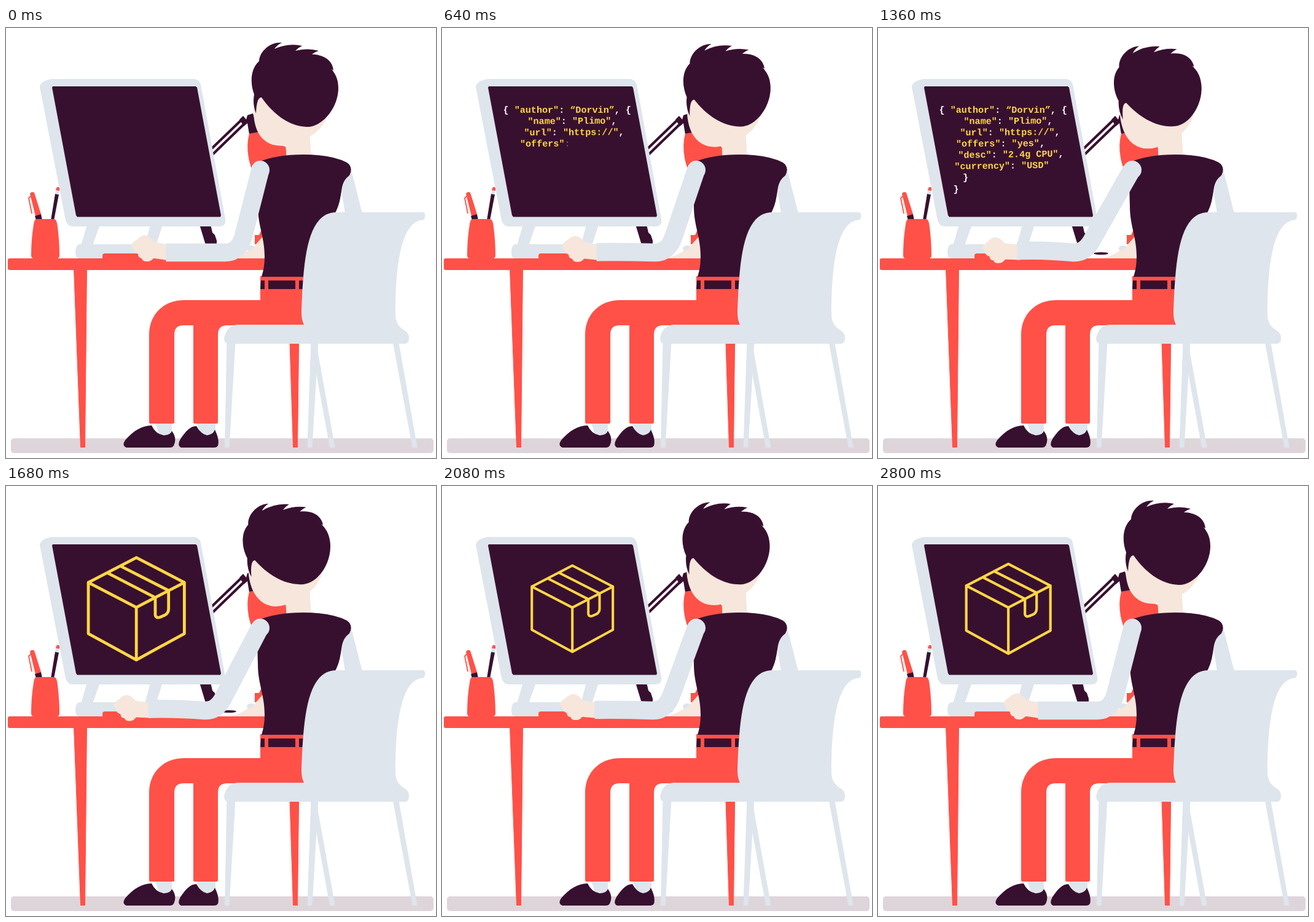
Write an HTML page that moves like this. It is 700 px wide and 700 px high and loops after 2.88 s.

```html
<!DOCTYPE html>
<html lang="en">
<head>
<meta charset="utf-8">
<title>Coder at a desk</title>
<style>
  html, body { margin: 0; width: 100%; height: 100%; overflow: hidden; background: #fff; }
  svg { display: block; width: 100%; height: 100%; }
  .dark { fill: #38102f; }
  .red { fill: #ff5148; }
  .pale { fill: #dee5ec; }
  .skin { fill: #f6e6dc; }
  .legs { stroke-width: 1; stroke-linejoin: round; }
  .pale.legs { stroke: #dee5ec; }
  .red.legs { stroke: #ff5148; }
  .line { fill: none; stroke: #38102f; }
  #code { font: bold 15.1px "Liberation Mono", "Courier New", monospace; fill: #fff; }
  #code text { white-space: pre; }
  #code .str { fill: #ffd746; }
  #box { fill: none; stroke: #ffd746; stroke-width: 4.2; stroke-linejoin: round; stroke-linecap: round; }
</style>
</head>
<body>
<svg viewBox="0 0 700 700">
  <rect x="8" y="668" width="688" height="24" rx="5" fill="#ded5db"/>

  <!-- lamp -->
  <path class="line" stroke-width="4.2" d="M332 199L386 147M332 210L392 152"/>
  <path class="dark" d="M380 149L386 143L391 149L393 142L402 139L412 172L396 173L393 155L387 160Z"/>
  <path class="red" d="M396 172Q391 190 395 212Q398 226 402 234L430 232L457 215L456 195Q455 192 450 192L436 165Z"/>
  <path class="dark" d="M315 320H333L336 333L340 337L343 346V353H325Z"/>
  <ellipse class="dark" cx="363" cy="367" rx="12" ry="2"/>
  <path class="red" d="M405 337H412L418 324H424V352H405Z"/>

  <!-- desk -->
  <rect class="red" x="3" y="375" width="425" height="19" rx="3"/>
  <path class="red legs" d="M110.5 390H131.5L128.5 682.5H121.5Z M461 480H477L474.5 682.5H467.5Z"/>

  <!-- pens and cup -->
  <path class="red" d="M39 270Q41 265 46 268L57 303L48 306Z"/>
  <path d="M41 273L37 277L42 302" fill="none" stroke="#ff5148" stroke-width="1.8"/>
  <path class="dark" d="M47 306L57 303L59 313H49Z M80 270L86 271L78 313H73Z"/>
  <path class="pale" d="M81 263L87 264L86 271L80 270Z"/>
  <path class="red" d="M81 264Q82 258 86 259Q88 261 87 265Z"/>
  <path class="red" d="M50 311H78Q83 311 84 324Q87 348 87 370Q87 375 83 375H45Q41 375 41 370Q41 344 45 320Q46 311 50 311Z"/>

  <!-- monitor -->
  <path class="pale" d="M132 320H153L141 354H122Z M235 320H255L244 354H226Z"/>
  <path class="pale" d="M119 352H320V375H118Q113 374 113 365Q113 354 119 352Z"/>
  <path class="pale" d="M55 96Q56 86 75 83H306Q315 84 317 92L357 311Q359 323 346 323H109Q100 323 97 313Z"/>
  <path class="dark" d="M76 95H309L311 97L350 305L349 307.5H116L114 305L75 97Z"/>
  <g id="code"></g>
  <path id="box" d="M0 -73L68.5 -37.5V35.5L0 73L-68.5 35.5V-37.5ZM-68.5 -37.5L0 -2L68.5 -37.5M0 -2V73
    M-41 -51L27 -16V9Q28 14 34 12L41 9Q46 6 46 0V-26L-23 -61"/>
  <rect class="red" x="157" y="367" width="70" height="10" rx="4"/>

  <!-- far arm -->
  <ellipse class="pale" cx="399" cy="359" rx="7" ry="5"/>
  <path class="skin" d="M366 375Q386 369 394 362Q402 362 406 353L422 335V375Z"/>
  <path class="pale" d="M562 231L580 302H552L546 264L550 240Z"/>

  <!-- legs and shoes -->
  <path class="pale" d="M242 640H270V664H250Z M309 640H341V664H318Z"/>
  <path class="dark" d="M196 683Q188 680 194 671C207 656 221 647 237 647Q244 662 258 663Q268 662 270 656Q279 668 273 680Q271 683 267 683Z
    M285 683Q278 680 284 669C292 657 300 648 310 648Q317 661 327 663Q337 662 340 654Q348 670 345 680Q343 683 339 683Z"/>
  <path class="red" d="M414 404H490V484H360Q345 484 345 499V642Q345 644 343 644H307Q305 644 305 642V484H289Q274 484 274 499V642Q274 644 272 644H235Q233 644 233 642V499C233 466 257 443 290 443H414Z"/>
  <path class="dark" d="M415 411H421V425H414Z M427 411H471V425H427Z M477 411H490V425H477Z"/>

  <path class="skin" d="M453 165H494L497 212H457Z"/>
  <g id="head">
    <path class="skin" d="M405 112C399 148 406 181 434 190Q446 193 455 191L494 177Q512 167 522 147L500 110Z"/>
    <path class="dark" d="M449 24C433 22 413 36 412 54C398 66 397 90 404 108Q401 124 407 139Q408 112 416 113C434 139 460 160 490 161C516 161 541 129 541 98C541 84 537 76 530 67L533 69C532 54 519 43 498 43Q503 39 509 37Q491 32 471 37Q476 32 482 29Q460 24 437 34Q442 27 449 24Z"/>
  </g>
  <path class="dark" d="M408 219Q440 206 484 206Q530 206 555 219Q566 227 559 240C546 250 547 262 545 272Q542 292 534 304L500 405H416Q421 390 421 372C421 340 410 322 410 290Z"/>

  <!-- chair -->
  <path class="pale legs" d="M360 510H373L363 682.5H356.5Z M497 510H508L498 682.5H491Z M496 510H504L535 682.5H527.5Z M630 510H638.5L669 682.5H662Z"/>
  <path class="pale" d="M538 300H678Q683 300 682 307Q682 313 675 313C648 318 634 368 634 466Q634 483 647 491Q657 497 656 505Q656 513 650 514H360Q353 510 356 501Q361 484 377 483H485Q481 475 481 463C484 380 489 300 538 300Z"/>

  <!-- near arm -->
  <path id="hand" class="skin" d="M204 354Q207 347 214 344Q222 336 229 338Q236 340 241 348Q252 351 264 352V378Q250 376 240 375Q235 381 229 380Q222 380 221 375Q215 374 215 368Q208 365 207 358Z"/>
  <circle class="pale" cx="414" cy="231" r="15"/>
  <path id="arm" fill="none" stroke="#dee5ec" stroke-width="29.5"/>
</svg>
<script>
const LOOP = 2880, STEP = 80, SWING = 2800, CLEAR = 1400, TYPE_RATE = 0.102;
const $ = id => document.getElementById(id);
const clamp = v => Math.min(1, Math.max(0, v));
const mix = (a, b, k) => a + (b - a) * k;
const smooth = u => u * u * (3 - 2 * u);
const easeOut = u => 1 - (1 - u) ** 2;

// x, tilt in degrees, text
const LINES = [
  [99.5, 0, '{ "author": “Dorvin”, {'],
  [139.5, -0.3, '"name": "Plimo",'],
  [133.5, -0.3, '"url": "https://",'],
  [127, -0.4, '"offers": "yes",'],
  [130.5, -0.8, '"desc": "2.4g CPU",'],
  [124.5, -0.8, '"currency": "USD"'],
  [138, 0, '}'],
  [122.5, 0, '}']
];

function add(parent, tag, attrs) {
  const el = document.createElementNS('http://www.w3.org/2000/svg', tag);
  for (const key in attrs) el.setAttribute(key, attrs[key]);
  return parent.appendChild(el);
}

const chars = [];
LINES.forEach(([x, tilt, str], row) => {
  const y = 138 + row * 18.4;
  const line = add($('code'), 'text', { x, y, transform: `rotate(${tilt} ${x} ${y})` });
  let quoted = false;
  for (const ch of str) {
    const quote = /["“”]/.test(ch);
    const span = add(line, 'tspan', quoted || quote ? { class: 'str' } : {});
    span.textContent = ch;
    if (quote) quoted = !quoted;
    chars.push(span);
  }
});

// time, scale, easing into it
const POP = [[CLEAR, 0], [1760, 1.2, easeOut], [2080, 0.963, smooth], [2360, 1, smooth]];

function boxScale(t) {
  for (let i = 1; i < POP.length; i++) {
    const [t0, s0] = POP[i - 1], [t1, s1, ease] = POP[i];
    if (t < t1) return mix(s0, s1, ease(clamp((t - t0) / (t1 - t0))));
  }
  return 1;
}

// shoulder, bend start, elbow, bend end, forearm control, wrist
const ARM_NEAR = [414, 231, 386.5, 339, 379, 365.5, 357, 365.5, 310, 365.5, 260.5, 365.5];
const ARM_FAR = [413, 231, 350, 342, 338, 366.5, 318, 365.5, 270, 361, 226.5, 362.5];

function draw(t) {
  const lean = (1 - Math.cos(2 * Math.PI * t / SWING)) / 2;
  const reach = lean ** 1.6;
  $('head').setAttribute('transform', `rotate(${-7.6 * lean} 478 206)`);
  $('hand').setAttribute('transform', `translate(${-34 * reach} 0) rotate(${-5 * reach} 262 365)`);
  const p = ARM_NEAR.map((v, i) => mix(v, ARM_FAR[i], reach));
  $('arm').setAttribute('d', `M${p[0]} ${p[1]}L${p[2]} ${p[3]}Q${p.slice(4, 8).join(' ')}Q${p.slice(8).join(' ')}`);

  const typing = t < CLEAR;
  $('code').style.display = typing ? '' : 'none';
  $('box').style.display = typing ? 'none' : '';
  if (typing) {
    chars.forEach((c, i) => c.setAttribute('fill-opacity', clamp(t * TYPE_RATE - i)));
  } else {
    $('box').setAttribute('transform', `translate(212.2 199.8) scale(${boxScale(t)})`);
  }
}

const start = performance.now();
function tick() {
  const t = (performance.now() - start) % LOOP;
  draw(Math.floor(t / STEP) * STEP);
  requestAnimationFrame(tick);
}
tick();
</script>
</body>
</html>
```
